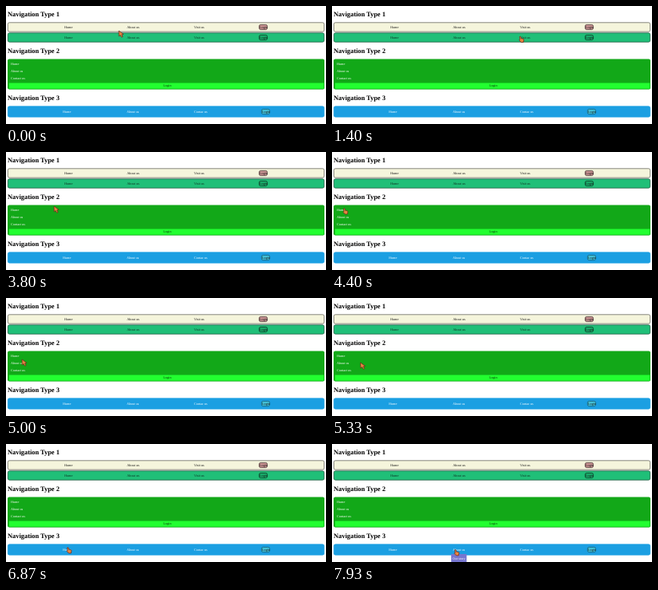
Animation of 400 by 148 pixels, one loop 8 s. Source, as an HTML page:

```html
<!DOCTYPE html>
<html lang="en">
<head>
<meta charset="utf-8">
<title>Navigation types</title>
<style>
  html, body { margin: 0; width: 100%; height: 100%; overflow: hidden; background: #fff; }
  svg { display: block; width: 400px; height: 148px; }
  text { font-family: "Liberation Serif", "Times New Roman", serif; font-size: 4.2px; text-rendering: geometricPrecision; }
  .title { font-size: 8.4px; font-weight: bold; }
</style>
</head>
<body>
<svg id="stage" viewBox="0 0 400 148"></svg>
<script>
const DURATION = 8000, STEP = 1000 / 15;
const stage = document.getElementById('stage');
const clickable = [];

function add(tag, attrs, parent = stage) {
  const node = document.createElementNS(stage.namespaceURI, tag);
  for (const name in attrs) node.setAttribute(name, attrs[name]);
  return parent.appendChild(node);
}

function box(x, y, width, height, fill, stroke = 'none', rx = 2, weight = .7, parent = stage) {
  return add('rect', { x, y, width, height, rx, fill, stroke, 'stroke-width': weight }, parent);
}

function label(content, x, y, fill, parent = stage) {
  const node = add('text', { x, y, fill }, parent);
  node.textContent = content;
  return node;
}

function link(...args) {
  clickable.push(label(...args).getBBox());
}

function button(x, y, fill, edge) {
  clickable.push(box(x + .4, y + .4, 10.2, 6.2, fill, edge).getBBox());
  label('Login', x + 1, y + 4.9, '#151515');
}

// A horizontal bar with its links and login button
function bar(y, height, fill, edge, ink, items, x, buttonX, buttonFill, buttonEdge) {
  box(2.3, y + .3, 395.4, height - .6, fill, edge);
  const middle = y + height / 2;
  items.forEach((content, i) => link(content, x[i], middle + 1.3, ink));
  button(buttonX, middle - 3.5, buttonFill, buttonEdge);
}

[13, 59, 118].forEach((y, i) =>
  label(`Navigation Type ${i + 1}`, 2, y, '#000').setAttribute('class', 'title'));

const columns = [73, 151.3, 235], links = ['Home', 'About us', 'Visit us'];
bar(20.5, 12, '#f5f5dc', '#55554e', '#111', links, columns, 316, '#c58f8f', '#3d2929');
bar(33.5, 12, '#20bf78', '#174d36', '#10291e', links, columns, 316, '#18a968', '#0b3020');

box(2, 66.5, 396, 38, '#12a818');
['Home', 'About us', 'Contact us'].forEach((content, i) => link(content, 6, 74.4 + i * 9, '#fff'));
const loginBar = box(3.6, 96.3, 394, 7.6, '#22ff30', '#12b51b', 1, .6);
clickable.push(loginBar.getBBox());
label('Login', 196.6, 101.3, '#0a300a');

bar(125.5, 14, '#1b9fe2', '#1b9fe2', '#fff',
  ['Home', 'About us', 'Contac us'], [71, 151, 235], 319, '#43bfd5', '#12566a');

const menu = add('g', {});
box(149, 138, 19.3, 10, '#7676d0', 'none', .5, 0, menu);
label('Our story', 150.6, 144.7, '#fff', menu);

const ink = { fill: '#e68440', stroke: '#66251c', 'stroke-width': .7, 'stroke-linejoin': 'round' };
const arrow = add('path', { d: 'M0 0L.2 7L2 5.5L3.6 8.2L5 7.4L3.7 4.9L6 4.4Z', ...ink });
const hand = add('path', { d: 'M-.5 -1Q.3 -1.7 1 -.9L1.5 1.2L4 1.7Q5 2 4.8 3.3L4.2 6H1.4L-1 3.4Q-.8 2.3 0 2.5Z', ...ink });

// Time, x and y of the pointer at each resting place
const stops = [
  [0, 141, 31], [750, 155, 39], [1400, 235, 39.5], [2470, 308, 27], [3000, 320, 39],
  [3800, 60, 68], [4400, 15, 72], [5000, 20, 77], [5930, 98, 97], [6850, 77, 131], [8000, 157, 134]
];

function pointerAt(time) {
  const i = stops.findIndex(stop => stop[0] > time);
  const [t0, x0, y0] = stops[i - 1], [t1, x1, y1] = stops[i];
  const k = (time - t0) / (t1 - t0), ease = k * k * (3 - 2 * k);
  return { x: x0 + (x1 - x0) * ease, y: y0 + (y1 - y0) * ease };
}

const show = (node, visible) => { node.style.display = visible ? '' : 'none'; };

function draw(now) {
  const time = Math.floor(now % DURATION / STEP + 1e-6) * STEP;
  const { x, y } = pointerAt(time);
  const isOver = ({ x: left, y: top, width, height }) =>
    x >= left - 1 && x <= left + width + 1 && y >= top && y <= top + height + 1;

  const active = clickable.some(isOver);
  for (const shape of [arrow, hand]) shape.setAttribute('transform', `translate(${x} ${y})`);
  show(arrow, !active);
  show(hand, active);

  const hovered = isOver(loginBar.getBBox());
  loginBar.setAttribute('fill', hovered ? '#22e629' : '#22ff30');
  loginBar.setAttribute('stroke', hovered ? '#0b8a14' : '#12b51b');
  loginBar.setAttribute('stroke-dasharray', hovered ? '2 1' : 'none');
  show(menu, time >= 7850);
}

const start = performance.now();
function tick() {
  draw(performance.now() - start);
  requestAnimationFrame(tick);
}
tick();
</script>
</body>
</html>
```
